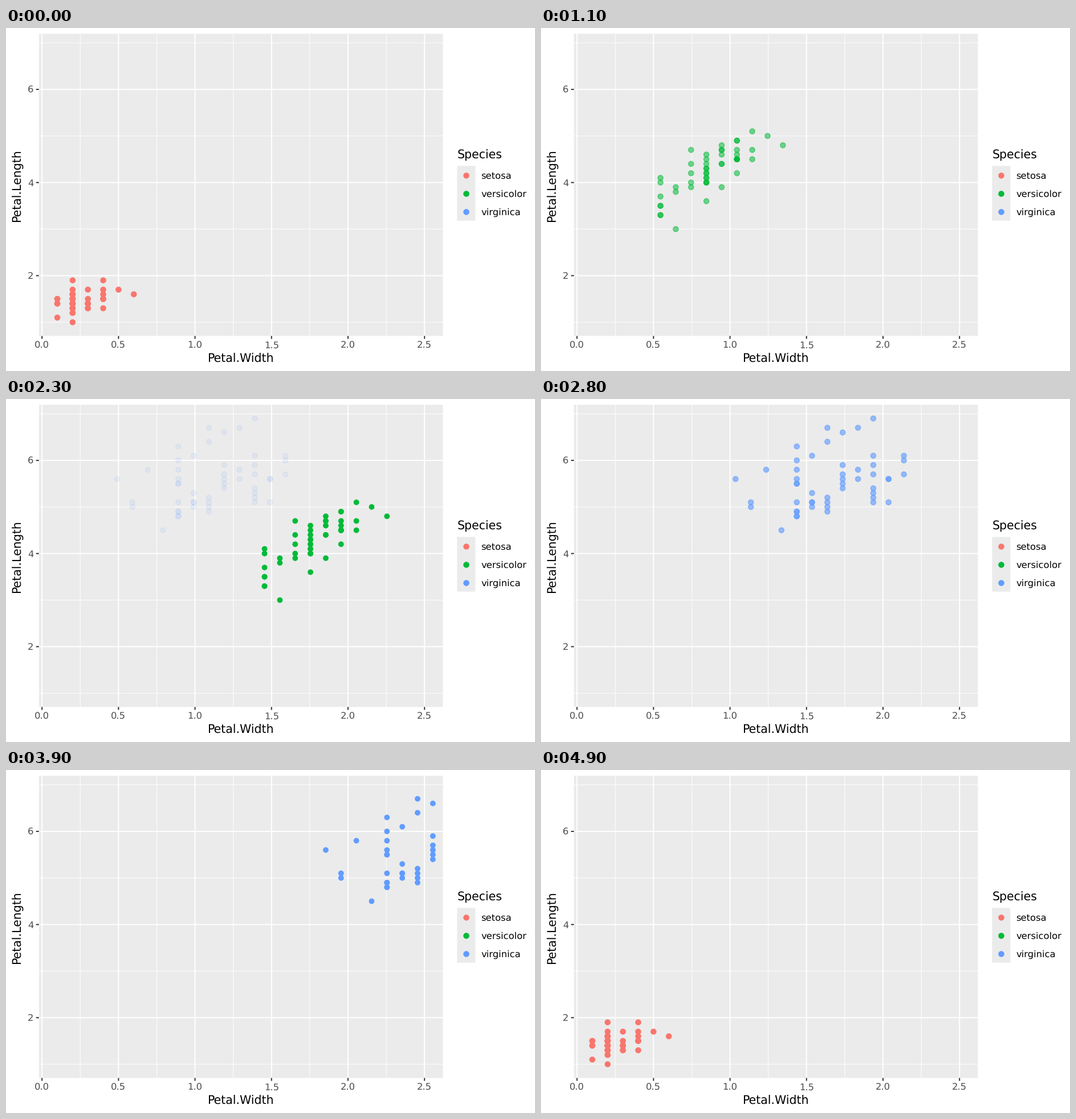
Write a matplotlib script that moves like this. It is 928x603 px and loops after 5 s.

```python
import numpy as np
import matplotlib as mpl
import matplotlib.pyplot as plt
from matplotlib.animation import FuncAnimation
from matplotlib.patches import Rectangle

mpl.rcParams["font.family"] = "DejaVu Sans"
mpl.rcParams["text.hinting"] = "none"

# At 72 dpi one point is one pixel.
W, H, DPI = 928, 603, 72
FRAMES, INTERVAL = 50, 100

LEFT, RIGHT, TOP, BOTTOM = 57.8, 766.4, 10.1, 541.4
X_MIN, X_MAX, Y_MIN, Y_MAX = -0.02, 2.62, 0.705, 7.195
PT = 133.33 / 72          # pixels per plot point
MAJOR, MINOR = 1.98, 0.99
STROKE = 1.31
DOT = 2
PANEL, AXIS_TEXT, TICK = "#EBEBEB", "#4D4D4D", "#333333"

# Petal lengths by petal width, both in millimetres.
SETOSA = {
    1: [11] + [14] * 2 + [15] * 2,
    2: [10] + [12] * 2 + [13] * 4 + [14] * 8 + [15] * 7 + [16] * 5 + [17, 19],
    3: [13] * 2 + [14] * 3 + [15, 17],
    4: [13] + [15] * 3 + [16, 17, 19],
    5: [17],
    6: [16],
}
VERSICOLOR = {
    10: [33] * 2 + [35] * 2 + [37, 40, 41],
    11: [30, 38, 39],
    12: [39, 40, 42, 44, 47],
    13: [36] + [40] * 3 + [41, 42, 43] * 2 + [44, 45, 46],
    14: [39] + [44, 47] * 2 + [46, 48],
    15: [42] + [45] * 5 + [46, 47] + [49] * 2,
    16: [45, 47, 51],
    17: [50],
    18: [48],
}
VIRGINICA = {
    14: [56],
    15: [50, 51],
    16: [58],
    17: [45],
    18: [48, 49, 55] * 2 + [51, 56, 58, 60, 63],
    19: [50, 51, 51, 53, 61],
    20: [49, 50, 51, 52, 64, 67],
    21: [54, 55, 56, 57, 59, 66],
    22: [56, 58, 67],
    23: [51, 52, 53, 54, 57, 59, 61, 69],
    24: [51, 56, 56],
    25: [57, 60, 61],
}
SPECIES = [
    ("setosa", "#F8766D", SETOSA),
    ("versicolor", "#00BA38", VERSICOLOR),
    ("virginica", "#619CFF", VIRGINICA),
]


def px(x):
    return LEFT + (x - X_MIN) / (X_MAX - X_MIN) * (RIGHT - LEFT)


def py(y):
    return BOTTOM - (y - Y_MIN) / (Y_MAX - Y_MIN) * (BOTTOM - TOP)


def dot_area(size):
    """Marker area for a plot point size; the stroke part does not shrink."""
    radius = 0.375 * (size * 2.845 + 0.945) * PT
    return (2 * radius) ** 2


fig = plt.figure(figsize=(W / DPI, H / DPI), dpi=DPI, facecolor="white")
ax = fig.add_axes([0, 0, 1, 1])
ax.set_xlim(0, W)
ax.set_ylim(H, 0)
ax.axis("off")


def box(x0, y0, x1, y1):
    return ax.add_patch(Rectangle((x0, y0), x1 - x0, y1 - y0, facecolor=PANEL,
                                  linewidth=0, snap=False, zorder=0))


def line(xs, ys, color, width, z):
    ax.plot(xs, ys, color=color, lw=width, snap=False, zorder=z,
            solid_capstyle="butt")


def label(x, y, s, size, color="black", ha="left", **kw):
    ax.text(x, y, s, fontsize=size, color=color, ha=ha, va="baseline", **kw)


def dots(xs, ys, color):
    # One size per dot keeps sub-pixel positions.
    return ax.scatter(xs, ys, s=np.full(len(xs), dot_area(DOT)), c=color,
                      linewidths=STROKE, zorder=4)


# Panel, grid and axes
panel = box(LEFT, TOP, RIGHT, BOTTOM)
for x in np.arange(0.25, 2.5, 0.5):
    line([px(x)] * 2, [TOP, BOTTOM], "white", MINOR, 1)
for y in (1, 3, 5, 7):
    line([LEFT, RIGHT], [py(y)] * 2, "white", MINOR, 1)
for x in np.arange(0, 2.6, 0.5):
    line([px(x)] * 2, [TOP, BOTTOM], "white", MAJOR, 2)
    line([px(x)] * 2, [BOTTOM, BOTTOM + 5.1], TICK, MAJOR, 2)
    label(px(x), 562.4, f"{x:.1f}", 16.4, AXIS_TEXT, "center")
for y in (2, 4, 6):
    line([LEFT, RIGHT], [py(y)] * 2, "white", MAJOR, 2)
    line([LEFT - 5.1, LEFT], [py(y)] * 2, TICK, MAJOR, 2)
    label(48.6, py(y) + 6, str(y), 16.4, AXIS_TEXT, "right")

label((LEFT + RIGHT) / 2, 588, "Petal.Width", 20.5, ha="center")
ax.text(26, (TOP + BOTTOM) / 2, "Petal.Length", fontsize=20.5, rotation=90,
        rotation_mode="anchor", ha="center", va="baseline")

# Legend
box(791.4, 242.4, 823.3, 338.6)
label(791.4, 229.5, "Species", 20.5)
for i, (name, color, _) in enumerate(SPECIES):
    cy = 258.5 + 32.05 * i
    dots([807.3, 807.3][:1], [cy], color)
    label(833.5, cy + 6, name, 16.4)

# Animated groups
groups = []
for _, color, table in SPECIES:
    pts = np.array([(w, n) for w, row in table.items() for n in row]) / 10
    art = dots(px(pts[:, 0]), py(pts[:, 1]), color)
    art.set_clip_path(panel)
    groups.append((art, pts))


def place(group, shift, size, alpha):
    art, pts = group
    art.set_offsets(np.column_stack([px(pts[:, 0] + shift), py(pts[:, 1])]))
    art.set_sizes(np.full(len(pts), dot_area(size)))
    art.set_alpha(alpha)
    art.set_visible(alpha > 0)


def update(frame):
    # 51 steps are shown in 50 frames, so the middle one is skipped.
    step = frame + (frame >= FRAMES // 2)
    stage, k = divmod(step, 17)
    t = max(0, k - 5) / 11
    place(groups[stage], 5 * t, DOT * (1 - t), 1)
    place(groups[(stage + 1) % 3], t - 1, DOT, t)
    place(groups[(stage + 2) % 3], 0, DOT, 0)
    return [art for art, _ in groups]


anim = FuncAnimation(fig, update, frames=FRAMES, interval=INTERVAL,
                     repeat=True, repeat_delay=0, blit=False)
plt.show()
```
